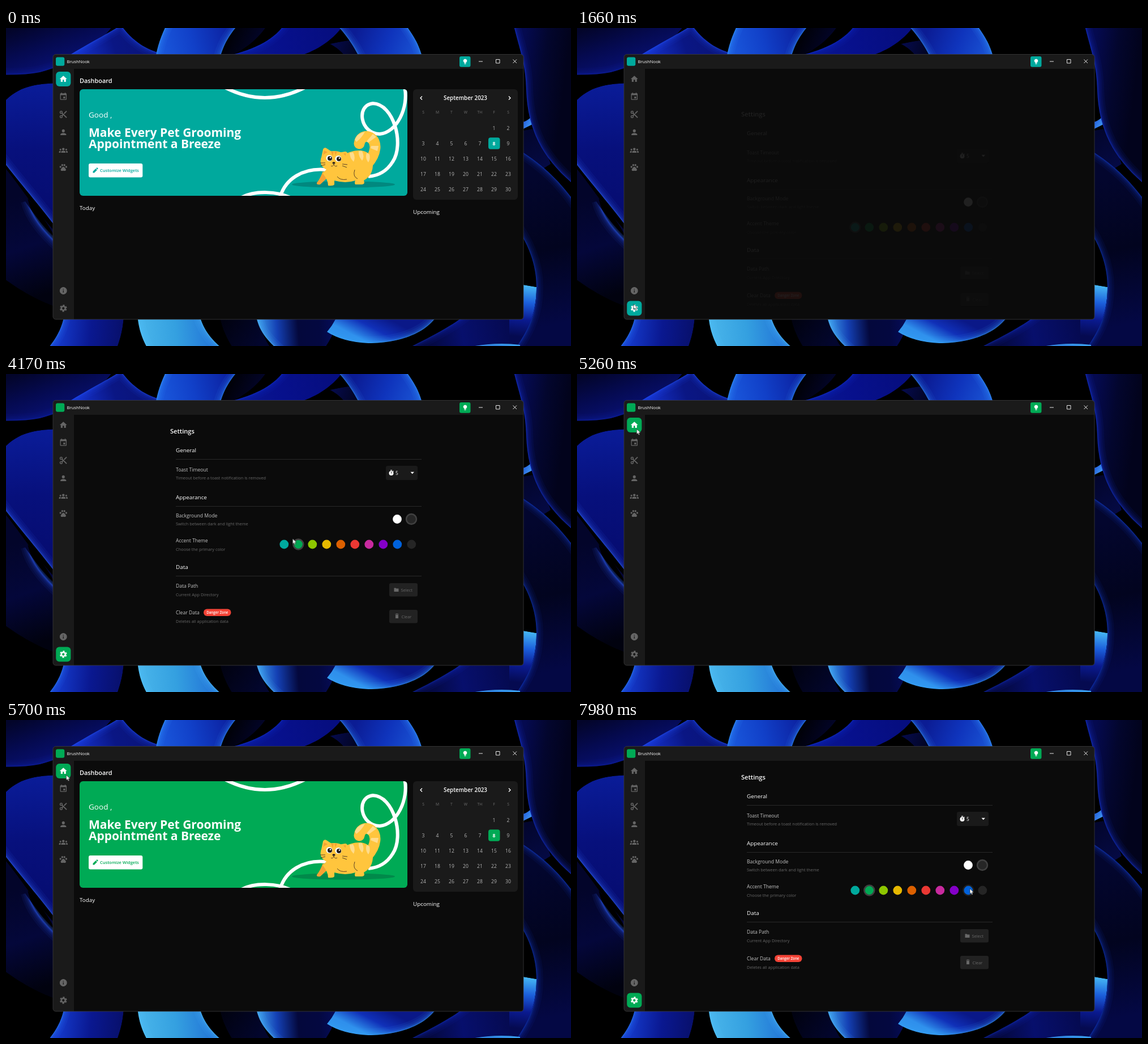
These frames come from a looping animation (998 px wide and 561 px high, 8000 ms). An HTML page with a canvas:

```html
<!DOCTYPE html>
<html lang="en">
<head>
<meta charset="utf-8">
<title>Dashboard</title>
<style>
@property --accent { syntax: "<color>"; inherits: true; initial-value: #00a99d; }
html, body { margin: 0; width: 100%; height: 100%; overflow: hidden; background: #000; }
canvas, svg { position: absolute; left: 0; top: 0; display: block; }
svg { font-family: "Open Sans", "Noto Sans", sans-serif; animation: accent 8s linear infinite; }
.accent { fill: var(--accent); }
.icon { fill: currentColor; stroke: none; }
.line { fill: none; stroke: currentColor; }
text { fill: #fff; }
.title { font-weight: 600; }
.head { font-size: 9.85px; }
.label { font-size: 8.6px; fill: #c4c4c4; }
.note { font-size: 7.4px; fill: #686868; }
.mid { text-anchor: middle; }
.ring { fill: none; stroke: #404040; stroke-width: 2.6; }

/* 1% is 80 ms */
.dash { animation: dash 8s linear infinite; }
.settings { animation: settings 8s linear infinite; }
.home-on { animation: homeOn 8s linear infinite; }
.gear-on { animation: gearOn 8s linear infinite; }
.ring0 { animation: ring0 8s linear infinite; }
.ring1 { animation: ring1 8s linear infinite; }
.ring8 { animation: ring8 8s linear infinite; }
.cursor { animation: cursor 8s linear infinite; }

@keyframes accent { 0%, 44.7% { --accent: #00a99d; } 47%, 100% { --accent: #00aa55; } }
@keyframes dash {
  0%, 17.5% { opacity: 1; transform: none; }
  19.5% { opacity: 0; transform: none; }
  66.6% { opacity: 0; transform: translateY(56px); animation-timing-function: ease-out; }
  69.25%, 83.9% { opacity: 1; transform: none; }
  86%, 100% { opacity: 0; transform: none; }
}
@keyframes settings {
  0%, 20.65% { opacity: 0; transform: translateY(56px); animation-timing-function: ease-out; }
  22.75%, 65.6% { opacity: 1; transform: none; }
  65.75% { opacity: 0; transform: none; }
  87.6% { opacity: 0; transform: translateY(56px); animation-timing-function: ease-out; }
  89.9%, 100% { opacity: 1; transform: none; }
}
@keyframes homeOn { 0%, 17.5% { opacity: 1; } 18.1%, 62.9% { opacity: 0; } 63.6%, 83.9% { opacity: 1; } 84.5%, 100% { opacity: 0; } }
@keyframes gearOn { 0%, 17.5% { opacity: 0; } 18.1%, 65.6% { opacity: 1; } 65.75%, 83.9% { opacity: 0; } 84.5%, 100% { opacity: 1; } }
@keyframes ring0 { 0%, 44.8% { opacity: 1; } 47%, 100% { opacity: 0; } }
@keyframes ring1 { 0%, 41.2% { opacity: 0; } 42%, 44.8% { opacity: .4; } 47%, 100% { opacity: 1; } }
@keyframes ring8 { 0%, 98.6% { opacity: 0; } 99.4%, 100% { opacity: .4; } }
@keyframes cursor {
  0%, .5% { transform: translate(1005px, 150px); animation-timing-function: cubic-bezier(.3, .2, .5, 1); }
  10.625%, 11% { transform: translate(118px, 433px); animation-timing-function: ease-in-out; }
  15.625%, 26.2% { transform: translate(100px, 487px); animation-timing-function: cubic-bezier(.4, 0, .75, .6); }
  36.6% { transform: translate(398px, 349px); animation-timing-function: cubic-bezier(.2, .45, .5, 1); }
  42.75%, 51% { transform: translate(520px, 297px); animation-timing-function: ease-in-out; }
  59.875%, 70.6% { transform: translate(105.5px, 97px); }
  71.25% { transform: translate(106.5px, 97px); animation-timing-function: ease-in-out; }
  79.875%, 89.8% { transform: translate(99.5px, 495px); animation-timing-function: cubic-bezier(.4, 0, .6, 1); }
  99.75%, 100% { transform: translate(694px, 297.5px); }
}
</style>
</head>
<body>
<canvas width="998" height="561"></canvas>
<svg width="998" height="561" viewBox="0 0 998 561">
  <defs>
    <clipPath id="content"><rect x="120" y="72" width="794" height="441"/></clipPath>
    <clipPath id="banner"><rect x="130" y="108" width="579" height="188" rx="6"/></clipPath>
    <g id="home"><path class="icon" d="M10 20v-6h4v6h5v-8h3L12 3 2 12h3v8z"/></g>
    <g id="event"><path class="icon" fill-rule="evenodd" d="M17 12h-5v5h5zM16 1v2H8V1H6v2H5q-2 0-2 2v14q0 2 2 2h14q2 0 2-2V5q0-2-2-2h-1V1zM19 19H5V8h14z"/></g>
    <g id="cut">
      <g class="line" stroke-width="2.2"><circle cx="6" cy="6" r="3"/><circle cx="6" cy="18" r="3"/><path stroke-width="2.8" d="M8 8L21 21M8 16L12 12M14 10L21 3"/></g>
    </g>
    <g id="person"><circle class="icon" cx="12" cy="8" r="4"/><path class="icon" d="M4 20v-2c0-2.7 5.3-4 8-4s8 1.3 8 4v2z"/></g>
    <g id="group" class="icon">
      <circle cx="12" cy="9" r="3.4"/><circle cx="4" cy="10.5" r="2.3"/><circle cx="20" cy="10.5" r="2.3"/>
      <path d="M6 19v-2c0-2.3 3-3.5 6-3.5s6 1.2 6 3.5v2zM0 19v-2c0-2 2-3 5-2.8q-.8 1.3-.7 4.8zM24 19v-2c0-2-2-3-5-2.8q.8 1.3.7 4.8z"/>
    </g>
    <g id="paw" class="icon">
      <ellipse cx="4" cy="10.5" rx="2.5" ry="2.8"/><ellipse cx="9" cy="5.5" rx="2.5" ry="3"/>
      <ellipse cx="15" cy="5.5" rx="2.5" ry="3"/><ellipse cx="20" cy="10.5" rx="2.5" ry="2.8"/>
      <path d="M12 10.5c3 0 4 3 6 5s1.500 6-2 6q-2 0-4-.5q-2 .5-4 .5c-3.500 0-4-4-2-6s3-5 6-5z"/>
    </g>
    <g id="info"><path class="icon" fill-rule="evenodd" d="M12 2a10 10 0 1 0 .01 0zM11 11h2v6h-2zM11 7h2v2h-2z"/></g>
    <g id="gear" class="line">
      <circle cx="12" cy="12" r="5.4" stroke-width="4"/>
      <circle cx="12" cy="12" r="8.4" stroke-width="3" stroke-dasharray="4.8 3.996" transform="rotate(14 12 12)"/>
    </g>
  </defs>

  <rect x="83" y="46.5" width="831" height="467.5" rx="5" fill="#1a1a1a"/>
  <path fill="#0b0b0b" d="M120 72H914V509Q914 514 909 514H120Z"/>
  <rect x="83" y="46.5" width="831" height="467.5" rx="5" fill="none" stroke="#3b3b3d" stroke-width=".8"/>

  <rect class="accent" x="88" y="51.5" width="15.3" height="15.3" rx="3"/>
  <text x="107.5" y="62.4" font-size="7.7">BrushNook</text>
  <rect class="accent" x="801" y="50" width="19.5" height="18.8" rx="3"/>
  <path fill="#fff" d="M811 54.5a3.4 3.4 0 0 1 1.7 6.3v1h-3.4v-1a3.4 3.4 0 0 1 1.7-6.3zM809.5 62.5h3v1.2h-3z"/>
  <path fill="none" stroke="#e4e4e4" d="M835 59H842M865.5 55.5h6.5v6.5h-6.5zM895.5 55.5l6.5 6.5M902 55.5l-6.5 6.5"/>

  <g id="nav" color="#656565"></g>

  <g clip-path="url(#content)">
    <g class="dash">
      <text class="title" x="130" y="97" font-size="10.9">Dashboard</text>
      <g clip-path="url(#banner)">
        <rect class="accent" x="130" y="108" width="579" height="188"/>
        <g fill="none" stroke="#fff" stroke-width="6">
          <path d="M385 104Q457 142 530 104"/>
          <path d="M704 104C712 140 690 185 660 187C625 186 618 136 648 133C685 134 704 205 683 236Q668 260 640 262"/>
          <path d="M484 299C493 266 525 246 566 250"/>
          <path d="M416 299C440 286 480 288 504 300"/>
        </g>
        <ellipse cx="596" cy="276" rx="91" ry="5.800" fill="#04302c" opacity=".27"/>
        <g id="cat">
          <path d="M560 252Q555 266 549 273Q548 277 555 276L567 265Z" fill="#f5a233"/>
          <path d="M638 240C654 222 657 201 643 193C633 188 625 195 624 204" fill="none" stroke="#ffc53d" stroke-width="19" stroke-linecap="round"/>
          <path d="M616 197Q621 185 634 183Q629 193 619 201ZM648 187L654 192L640 202L637 200ZM658 208L656 217L644 212L645 208Z" fill="#ffdc8c"/>
          <path d="M594 225C624 208 650 216 648 243Q647 261 632 269Q635 276 628 276H617Q615 273 617 269Q600 275 580 269V276Q578 279 569 278Q569 268 559 256Z" fill="#ffc53d"/>
          <path d="M613 219Q618 228 614 236Q607 229 607 220ZM629 217Q634 228 629 234Q622 226 623 217ZM642 223Q644 232 640 237Q634 230 637 220Z" fill="#ffdc8c"/>
          <path d="M556 233L560 214Q562 210 566 212L578 220ZM587 220L599 218Q603 218 603 222L602 242Z" fill="#ffc53d"/>
          <path d="M560 225L562 216L570 220ZM593 222L600 221L600 230Z" fill="#f5a233"/>
          <ellipse cx="579.5" cy="235" rx="24" ry="18" fill="#ffc53d"/>
          <path d="M574 218l3 8 2-8zM580 218l2 7 3-7z" fill="#f5a233"/>
          <g fill="#fff"><circle cx="571" cy="229.5" r="5.5"/><circle cx="587" cy="230.5" r="5.5"/></g>
          <g fill="#221d1c"><circle cx="572" cy="230" r="4"/><circle cx="588" cy="231" r="4"/><ellipse cx="579" cy="238" rx="2.600" ry="1.800"/></g>
          <g fill="#fff"><circle cx="573" cy="228.5" r="1.3"/><circle cx="589" cy="229.5" r="1.3"/></g>
          <path d="M574 243q3 3 5-3q2 6 6 3M555 238l9 0M556 243l8-2M594 240l9 1M594 243l8 3M616 250Q612 262 621 266M585 262Q590 269 602 267" fill="none" stroke="#4a3423" stroke-width=".9"/>
        </g>
        <text x="146" y="157.7" font-size="13.5" font-weight="500">Good ,</text>
        <g font-size="21" font-weight="700"><text x="146" y="191.5">Make Every Pet Grooming</text><text x="146" y="212">Appointment a Breeze</text></g>
        <rect x="146" y="239" width="95.3" height="24.6" rx="3" fill="#fff"/>
        <path class="accent" d="M153.5 255.5v-2.4l5-5 2.4 2.4-5 5zM159.2 247.4l1-1q.6-.5 1.2 0l1 1q.6.6 0 1.2l-1 1z"/>
        <text class="title accent" x="166" y="254" font-size="7.5">Customize Widgets</text>
      </g>
      <text class="head" x="130" y="320.5">Today</text>
      <rect x="719" y="108" width="185" height="195" rx="6" fill="#1a1a1a"/>
      <text class="title mid" x="811.5" y="127" font-size="9.8">September 2023</text>
      <path d="M735 120.5l-3 3 3 3M888 120.5l3 3-3 3" fill="none" stroke="#fff" stroke-width="1.4"/>
      <rect class="accent" x="852" y="193.3" width="20.5" height="20.5" rx="4"/>
      <g id="days"></g>
      <text class="head" x="719" y="327.5">Upcoming</text>
    </g>

    <g class="settings">
      <text class="title" x="290" y="104.8" font-size="11.1">Settings</text>
      <g class="head"><text x="300" y="137.5">General</text><text x="300" y="221">Appearance</text><text x="300" y="344.3">Data</text></g>
      <path d="M300 150.5H734M300 233.5H734M300 356.5H734" stroke="#292929"/>
      <g id="labels"></g>
      <rect x="671" y="162" width="56" height="25" rx="3" fill="#1a1a1a"/>
      <circle cx="680.5" cy="175" r="4" fill="#fff"/>
      <path d="M679 169.8h3M683.5 171l1 1" stroke="#fff" stroke-width="1.2"/>
      <path d="M680.5 172.5v3" stroke="#1a1a1a"/>
      <text x="688" y="178" font-size="8.4">5</text>
      <path d="M714.5 172.7h6.5l-3.25 3.5z" fill="#fff"/>
      <circle cx="691" cy="256" r="7.9" fill="#fff"/>
      <circle cx="716" cy="256" r="7.9" fill="#262626"/><circle class="ring" cx="716" cy="256" r="8.9"/>
      <g id="swatches"></g>
      <rect x="349" y="414.5" width="48.5" height="12.5" rx="6.2" fill="#f44336"/>
      <text class="mid title" x="373.3" y="423" font-size="6.2">Danger Zone</text>
      <g fill="#222"><rect x="677" y="369" width="50" height="23.5" rx="3"/><rect x="677" y="416" width="50" height="23.5" rx="3"/></g>
      <path d="M685.5 377.5h3l1 1h4v5.5h-8zM688 425h5v6h-5zM687.5 423.3h2v-.7h2v.7h2v1h-6z" fill="#686868"/>
      <text class="note" x="697.5" y="383.5">Select</text><text class="note" x="698.5" y="430.5">Clear</text>
    </g>
  </g>

  <path class="cursor" d="M0 0V9.3L2.1 7.4L3.6 10.7L5.2 10L3.7 6.8H6.7Z" fill="#fff" stroke="#111" stroke-width=".6"/>
</svg>
<script>
const byId = id => document.getElementById(id);

const icon = (name, y) => `<use href="#${name}" transform="translate(93.6 ${y - 7.7}) scale(.64)"/>`;
const active = (name, y) => `<g class="${name}-on" color="#fff">
  <rect class="accent" x="88.2" y="${y - 13}" width="26.2" height="26" rx="6"/>${icon(name, y)}</g>`;
const tabs = { home: 90, event: 121, cut: 152.5, person: 184, group: 215.5, paw: 246, info: 463.5, gear: 494.5 };
byId("nav").innerHTML = Object.entries(tabs).map(([name, y]) => icon(name, y)).join("")
  + active("home", tabs.home) + active("gear", tabs.gear);

const cell = (col, y, s, style) => `<text class="mid" x="${737 + 25 * col}" y="${y}" ${style}>${s}</text>`;
let days = "S M T W TH F S".split(" ").map((d, i) => cell(i, 150.5, d, 'style="fill:#6d6d6d" font-size="6.8"')).join("");
for (let day = 1; day <= 30; day++) {
  const slot = day + 4;
  const style = day === 8 ? 'font-weight="700"' : 'style="fill:#b4b4b4"';
  days += cell(slot % 7, 180.2 + 27 * Math.floor(slot / 7), day, style + ' font-size="8.6"');
}
byId("days").innerHTML = days;

byId("labels").innerHTML = [
  [171.5, "Toast Timeout", "Timeout before a toast notification is removed"],
  [252.5, "Background Mode", "Switch between dark and light theme"],
  [297.3, "Accent Theme", "Choose the primary color"],
  [377.3, "Data Path", "Current App Directory"],
  [424.2, "Clear Data", "Deletes all application data"]
].map(([y, label, note]) => `<text class="label" x="300" y="${y}">${label}</text>
  <text class="note" x="300" y="${y + 14.3}">${note}</text>`).join("");

const colors = ["#00a99d", "#00a854", "#8dc600", "#e6b800", "#dc6000", "#ea3833", "#c82a9e", "#8400c8", "#0062dc", "#252525"];
byId("swatches").innerHTML = colors.map((color, i) => {
  const at = `cx="${491.3 + 25 * i}" cy="300.5"`;
  const ring = [0, 1, 8].includes(i) ? `<circle class="ring ring${i}" ${at} r="8.9"/>` : "";
  return `<circle ${at} r="7.9" fill="${color}"/>${ring}`;
}).join("");

// Wallpaper: dark glossy ribbons; only the lit edge of each one glows
const ctx = document.querySelector("canvas").getContext("2d");
ctx.fillRect(0, 0, 998, 561);
function ribbon(shape, [x0, y0, x1, y1], tones, edge, glow) {
  const path = new Path2D(shape);
  const fill = ctx.createLinearGradient(x0, y0, x1, y1);
  tones.forEach((tone, i) => fill.addColorStop(i / (tones.length - 1), tone));
  ctx.save();
  ctx.clip(path);
  ctx.fillStyle = fill;
  ctx.fill(path);
  if (edge) {
    ctx.strokeStyle = glow;
    for (const width of [24, 17, 11, 7, 4, 2]) {
      ctx.globalAlpha = .05 + .5 / width;
      ctx.lineWidth = width;
      ctx.stroke(new Path2D(edge));
    }
  }
  ctx.restore();
}
// top
ribbon("M-20 -20H200C165 35 120 62 60 78Q30 84 -20 82Z", [20, 0, 50, 84], ["#03052a", "#050a50", "#081070"],
  "M-20 82Q30 84 60 78Q110 65 150 40", "#1226a8");
ribbon("M112 48C150 25 180 10 203 -5C225 25 250 40 280 46V90H112Z", [130, 50, 250, 10], ["#1430c8", "#0a1684", "#0a1478"],
  "M112 48C150 25 180 10 203 -5C225 25 250 40 280 46", "#2450f0");
ribbon("M376 60C420 40 450 20 470 -20H400Z", [390, 0, 450, 30], ["#000", "#03052c"]);
ribbon("M370 54C440 40 480 20 500 -20H606C580 25 545 42 505 54Z", [400, 40, 570, 0], ["#0a1890", "#07108c", "#060e80"],
  "M370 54C440 40 480 20 500 -20", "#1230c8");
ribbon("M262 70C266 30 275 12 290 -20H422C392 14 382 30 374 70Z", [270, 40, 390, 10], ["#1a58dc", "#1140c8", "#0c24a4"],
  "M262 70C266 30 275 12 290 -20M422 -20C392 14 382 30 374 70", "#3a9cf8");
ribbon("M572 28Q600 22 620 20L640 60H605Q595 40 572 28Z", [580, 30, 625, 46], ["#050a48", "#02041c"]);
ribbon("M545 -20H695C722 15 733 32 739 70H633C615 30 600 12 585 -5Z", [620, 0, 730, 46], ["#0b1c94", "#0f34bc", "#1a54d4"],
  "M695 -20C722 15 733 32 739 70H633C615 30 600 12 585 -5", "#3a98f6");

// left
ribbon("M-20 450V225C30 280 60 340 110 380V500C50 480 20 460 -20 430Z", [10, 300, 70, 470], ["#03052a", "#04073a", "#01020f"]);
ribbon("M38 300C60 325 75 345 95 385C65 358 45 333 38 300Z", [40, 300, 85, 370], ["#000", "#000"]);
ribbon("M-20 450V225C50 330 60 350 110 390V500Z", [0, 300, 85, 450], ["#0000", "#0000"],
  "M38 305C45 333 65 358 95 385", "#2c5cf0");
ribbon("M-20 150C15 102 45 97 110 97V380C50 300 20 270 -20 215Z", [30, 100, 40, 330], ["#0a1c98", "#07107c", "#060c70"],
  "M110 380C50 300 20 270 -20 215", "#3468ff");

// right
ribbon("M890 185L930 178C945 205 960 228 962 240L946 250L890 210Z", [915, 190, 955, 245], ["#03062e", "#050a44"]);
ribbon("M890 168Q918 170 930 154V170L890 190Z", [914, 165, 932, 175], ["#2460dc", "#48a8f8"]);
ribbon("M893 -20C907 40 918 60 919 110C922 190 955 240 1020 290V-20Z", [905, 100, 985, 110], ["#050a50", "#03062e", "#02031c"],
  "M893 -20C907 40 918 60 919 110C922 190 955 240 1020 290", "#1a3ce0");
ribbon("M700 570C760 540 800 520 830 490H940C925 535 910 550 895 570Z", [720, 550, 890, 520], ["#03062c", "#070f6c", "#050a50"],
  "M700 570C760 540 800 520 830 490", "#1530c0");
ribbon("M890 205C950 240 985 275 1020 330V580H888C925 535 937 500 937 457C937 420 925 380 890 335Z", [930, 260, 985, 520],
  ["#03062e", "#02041f", "#040844"], "M890 205C950 240 985 275 1020 330M890 335C925 380 937 420 937 457C937 500 925 535 888 580", "#1640d4");
ribbon("M890 449L937 457C937 500 925 535 888 580Z", [922, 454, 912, 545], ["#46b8f4", "#1c60dc", "#0a1a90", "#050a50"]);

// bottom
ribbon("M106 490H209C208 530 203 548 190 580H62C92 545 100 530 106 490Z", [95, 530, 205, 540], ["#1438c8", "#0a1890", "#08106c"],
  "M106 490C100 530 92 545 62 580", "#3080f4");
ribbon("M374 490H447C449 535 455 550 480 580H410C388 545 380 530 374 490Z", [380, 514, 450, 561], ["#01020f", "#03062e"]);
ribbon("M231 490H338C345 530 360 550 400 580H258C238 545 233 530 231 490Z", [240, 540, 360, 530], ["#48b4ea", "#34a0e0", "#2478d8"],
  "M231 490C233 530 238 545 258 580M338 490C345 530 360 550 400 580", "#54c0f4");
ribbon("M439 490H590C585 530 575 550 552 580H495C455 548 443 530 439 490Z", [442, 535, 590, 525], ["#40a4ee", "#1440b4", "#04083c", "#040840", "#060e60"],
  "M439 490C443 530 455 548 495 580", "#50b0f4");
ribbon("M590 490H770C755 535 700 556 640 556Q595 554 567 536Q585 515 590 490Z", [670, 510, 645, 558], ["#0a1888", "#1030b8", "#2f90ec"],
  "M770 490C755 535 700 556 640 556Q595 554 567 536", "#3ca4f4");
ribbon("M790 570Q850 552 908 559V580H790Z", [800, 560, 900, 560], ["#0c28a8", "#3090e8"],
  "M790 570Q850 552 908 559", "#48b4f8");
</script>
</body>
</html>
```
